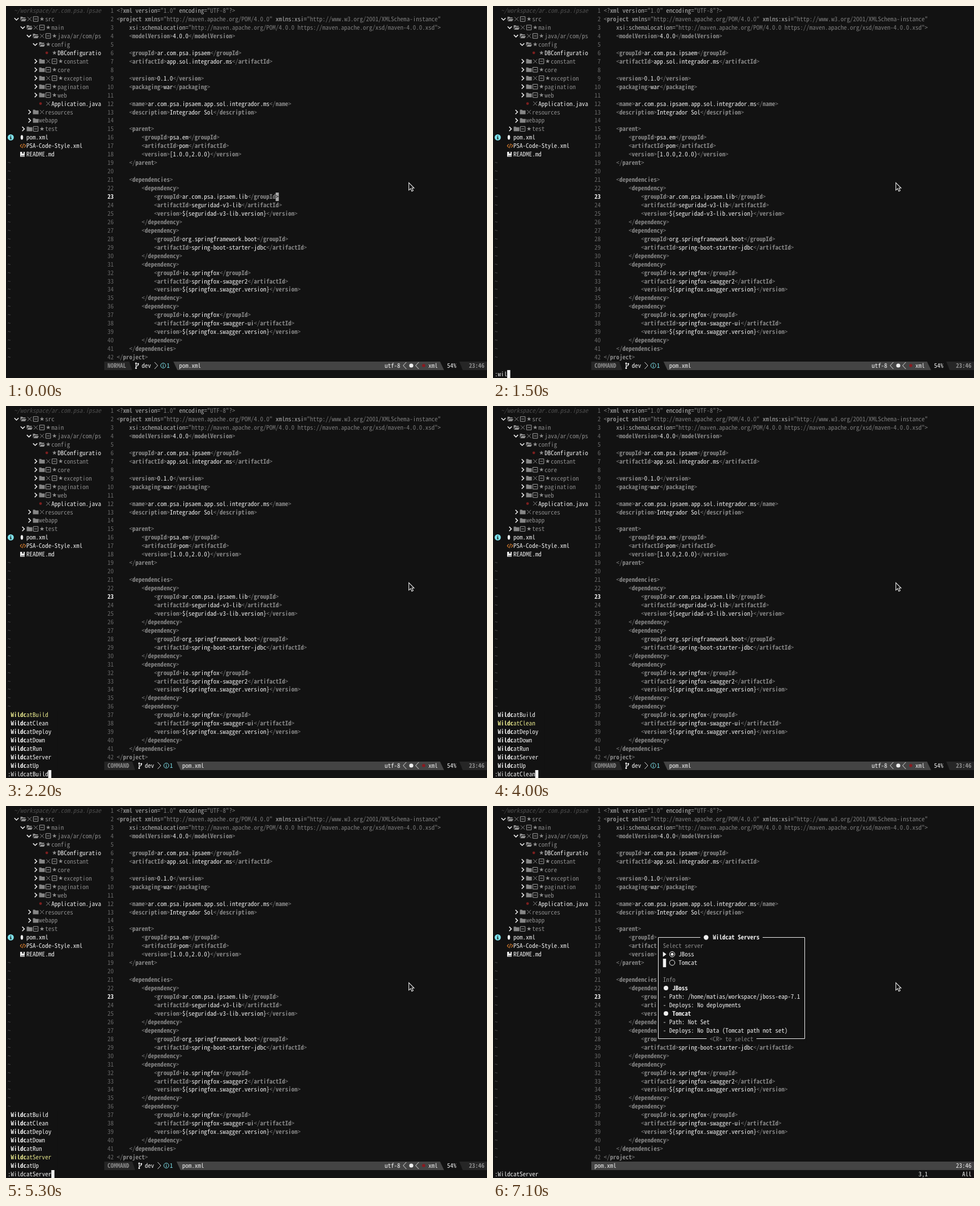
An HTML page for the animation above (8000 ms loop, 851x658 px).

```html
<!DOCTYPE html>
<html lang="en">
<head>
<meta charset="utf-8">
<title>Editor session</title>
<style>
  html, body { margin: 0; width: 100%; height: 100%; overflow: hidden; background: #121212; }
  svg { display: block; width: 100vw; height: 100vh; }
  text {
    font-family: "Noto Sans Mono CJK JP", "Noto Sans Mono CJK SC", "Noto Sans Mono CJK KR", "Noto Sans Mono", "DejaVu Sans Mono", monospace;
    white-space: pre;
    text-rendering: geometricPrecision;
    fill: #eee;
  }
  .bold, .tag, .now, .hit { font-weight: 700; }
  .tag { fill: #848484; }
  .mark { fill: #808080; }
  .attr { fill: #b0b0b0; }
  .str { fill: #7c7c7c; }
  .num { fill: #686868; }
  .dir { fill: #8a8a8a; }
  .dim { fill: #505050; }
  .root { fill: #4c4c4c; font-style: italic; }
  .mode { fill: #8a8a8a; font-weight: 700; }
  .info { fill: #7fe3ec; }
  .dark { fill: #121212; }
  .sel text { fill: #e3e38a; }
  #pointer { animation: drift 8s step-end infinite; }
  @keyframes drift {
    0%, 11.25% { transform: none; }
    7.5% { transform: translate(-4px, -8px); }
  }
</style>
</head>
<body>
<svg id="stage" viewBox="0 0 851 658"></svg>
<script>
const CELL = 5.513, ROW = 14.95;
const X = col => 3 + col * CELL;
const Y = row => 1.1 + row * ROW;
const stage = document.getElementById('stage');
const sheet = document.head.appendChild(document.createElement('style'));

function el(tag, attrs, parent = stage) {
  const node = document.createElementNS('http://www.w3.org/2000/svg', tag);
  for (const key in attrs) node.setAttribute(key, attrs[key]);
  return parent.appendChild(node);
}

// Pick the font size whose advance equals one grid cell.
const probe = el('text', { y: -50, style: 'font-size:100px' });
probe.textContent = 'M'.repeat(20);
const size = CELL * 2000 / probe.getComputedTextLength();
probe.style.fontSize = size + 'px';
const gap = CELL - probe.getComputedTextLength() / 20;
probe.remove();
stage.style.fontSize = size + 'px';
stage.style.letterSpacing = gap + 'px';

function put(col, row, text, cls = '', parent = stage) {
  el('text', { x: X(col), y: Y(row) + 11, class: cls }, parent).textContent = text;
}
function box(x, y, width, height, fill, parent = stage) {
  el('rect', { x, y, width, height, fill }, parent);
}
function block(col, row, parent, fill = '#f2f2f2') {
  box(X(col), Y(row), CELL, ROW, fill, parent);
}
function shape(x, y, d, fill, parent = stage) {
  el('path', { d, fill, transform: `translate(${x} ${y})` }, parent);
}
function stroke(x, y, d, color, width = 1, parent = stage) {
  el('path', { d, fill: 'none', stroke: color, 'stroke-width': width, transform: `translate(${x} ${y})` }, parent);
}
function disc(cx, cy, r, fill, parent = stage) {
  el('circle', { cx, cy, r, fill }, parent);
}
function ring(cx, cy, r, color, parent = stage) {
  el('circle', { cx, cy, r, fill: 'none', stroke: color }, parent);
}
function poly(points, fill, parent = stage) {
  el('polygon', { points, fill }, parent);
}

// A group that is visible only between two times of the loop.
let count = 0;
function during(from, to) {
  const id = 'w' + count++;
  sheet.textContent += `@keyframes ${id} { 0% { visibility: hidden } ${from / 80}% { visibility: visible } ${to / 80}% { visibility: hidden } }\n`;
  return el('g', { style: `animation: ${id} 8s step-end infinite` });
}

// File tree
const starPath = 'M' + Array.from({ length: 10 }, (_, i) => {
  const r = i % 2 ? 1.6 : 4.1, a = i * Math.PI / 5;
  return `${(r * Math.sin(a)).toFixed(2)} ${(-r * Math.cos(a)).toFixed(2)}`;
}).join('L') + 'Z';

const icons = {
  'v': (x, y) => stroke(x - 1, y, 'M-3.7-1.8L0 1.9L3.7-1.8', '#eee', 1.5),
  '>': (x, y) => stroke(x, y, 'M-1.9-3.8L1.9 0L-1.9 3.8', '#eee', 1.5),
  'o': (x, y) => shape(x, y, 'M-5-4h3.5l1 1.2H4V-1H-2.5L-5 3ZM-2 0H5.5L3.5 4H-4.3Z', '#909090'),
  'f': (x, y) => shape(x, y, 'M-5-4h3.6l1.2 1.2H5V4H-5Z', '#858585'),
  'x': (x, y) => stroke(x, y, 'M-3.6-3.6L3.6 3.6M3.6-3.6L-3.6 3.6', '#858585'),
  '-': (x, y) => stroke(x, y, 'M-4.2-4.2H4.2V4.2H-4.2ZM-2.4 0H2.4', '#a0a0a0'),
  '*': (x, y) => shape(x, y, starPath, '#909090'),
  'j': (x, y) => disc(x - 2.5, y, 2.4, '#7c1f1f'),
  'm': (x, y) => el('ellipse', { cx: x - 2.5, cy: y, rx: 2.2, ry: 4.2, fill: '#eee' }),
  'c': (x, y) => stroke(x - .5, y, 'M-2.2-3L-4.8 0L-2.2 3M2.2-3L4.8 0L2.2 3M1-4L-1 4', '#e0812f', 1.1),
  'b': (x, y) => {
    shape(x - 1.5, y, 'M-4-4.3H4V4.3H-4Z', '#eee');
    shape(x - 1.5, y, 'M-.5-4.3H2V-.8L.7-1.8L-.5-.8ZM-2.5 2.2H4V3.1H-2.5Z', '#121212');
  }
};

const tree = [
  [2, 'vox-*', 'src', 'dir'],
  [4, 'vox-*', 'main', 'dir'],
  [6, 'vox-*', 'java/ar/com/ps', 'dir'],
  [8, 'vo*', 'config', 'dir'],
  [12, 'j*', 'DBConfiguratio'],
  [8, '>fx-*', 'constant', 'dir'],
  [8, '>f-*', 'core', 'dir'],
  [8, '>fx-*', 'exception', 'dir'],
  [8, '>f-*', 'pagination', 'dir'],
  [8, '>f-*', 'web', 'dir'],
  [10, 'jx', 'Application.java'],
  [6, '>fx', 'resources', 'dir'],
  [6, '>f', 'webapp', 'dir'],
  [4, '>f-*', 'test', 'dir'],
  [4, 'm', 'pom.xml'],
  [4, 'c', 'PSA-Code-Style.xml'],
  [4, 'b', 'README.md']
];
put(2, 0, '~/workspace/ar.com.psa.ipsae', 'root');
tree.forEach(([col, marks, label, cls], i) => {
  [...marks].forEach((m, k) => icons[m](X(col + 2 * k) + CELL, Y(i + 1) + 7));
  put(col + 2 * marks.length, i + 1, label, cls);
});
disc(8.4, 232.4, 5.4, '#7fe3ec');
shape(8.4, 232.4, 'M-.8-3.2H.8V-1.8H-.8ZM-1.5-.9H.8V2.2H1.6V3.1H-1.6V2.2H-.7V0H-1.5Z', '#121212');
for (let row = 18; row < 42; row++) put(0, row, '~', 'dim');

// Editor text
const pom = `<?xml version="1.0" encoding="UTF-8"?>
<project xmlns="http://maven.apache.org/POM/4.0.0" xmlns:xsi="http://www.w3.org/2001/XMLSchema-instance"
    xsi:schemaLocation="http://maven.apache.org/POM/4.0.0 https://maven.apache.org/xsd/maven-4.0.0.xsd">
    <modelVersion>4.0.0</modelVersion>

    <groupId>ar.com.psa.ipsaem</groupId>
    <artifactId>app.sol.integrador.ms</artifactId>

    <version>0.1.0</version>
    <packaging>war</packaging>

    <name>ar.com.psa.ipsaem.app.sol.integrador.ms</name>
    <description>Integrador Sol</description>

    <parent>
        <groupId>psa.em</groupId>
        <artifactId>pom</artifactId>
        <version>[1.0.0,2.0.0)</version>
    </parent>

    <dependencies>
        <dependency>
            <groupId>ar.com.psa.ipsaem.lib</groupId>
            <artifactId>seguridad-v3-lib</artifactId>
            <version>\${seguridad-v3-lib.version}</version>
        </dependency>
        <dependency>
            <groupId>org.springframework.boot</groupId>
            <artifactId>spring-boot-starter-jdbc</artifactId>
        </dependency>
        <dependency>
            <groupId>io.springfox</groupId>
            <artifactId>springfox-swagger2</artifactId>
            <version>\${springfox.swagger.version}</version>
        </dependency>
        <dependency>
            <groupId>io.springfox</groupId>
            <artifactId>springfox-swagger-ui</artifactId>
            <version>\${springfox.swagger.version}</version>
        </dependency>
    </dependencies>
</project>`;

const TOKEN = /"[^"]*"|[\w:]+(?==")|<[\/?]?|\??>|=|[^<>"=\s?]+/g;
pom.split('\n').forEach((line, row) => {
  put(32, row, String(row + 1).padStart(2), row === 22 ? 'now' : 'num');
  let last = '';
  for (const { 0: part, index } of line.matchAll(TOKEN)) {
    const next = line[index + part.length];
    const cls = part[0] === '"' ? 'str'
      : /^[<?>]/.test(part) ? 'mark'
      : last[0] === '<' ? 'tag'
      : part === '=' || next === '=' ? 'attr' : '';
    put(35 + index, row, part, cls);
    last = part;
  }
});

const caret = during(0, 800);
block(86, 22, caret, '#a8a8a8');
put(86, 22, '>', 'dark', caret);

// Status line
const barTop = Y(42), barMid = barTop + 7, barEnd = barTop + ROW;
const BAND = '#444', EDGE = '#262626';

function statusLine(mode, from, to) {
  const g = during(from, to), end = 33 + mode.length;
  const left = X(end), start = X(end + 14);
  poly(`${X(31)},${barTop} ${left},${barTop} ${left + 5},${barEnd} ${X(31)},${barEnd}`, EDGE, g);
  put(32, 42, mode, 'mode', g);
  const bx = X(end + 2) + 2.5;
  stroke(bx, barMid, 'M-1.5-3V4M2.3-2V-.5L-1.5 2', '#eee', 1.2, g);
  disc(bx - 1.5, barMid - 4, 1.5, '#eee', g);
  disc(bx + 2.3, barMid - 3, 1.5, '#eee', g);
  disc(bx - 1.5, barMid + 4.5, 1.5, '#eee', g);
  put(end + 4, 42, 'dev', '', g);
  stroke(X(end + 8) + 3.5, barMid, 'M-2.8-6L2.8 0L-2.8 6', '#ddd', 1, g);
  const ix = X(end + 10) + 5;
  ring(ix, barMid, 4.4, '#7fe3ec', g);
  stroke(ix, barMid, 'M0-2.8V-1.5M0-.6V2.8', '#7fe3ec', 1.1, g);
  put(end + 12, 42, '1', 'info', g);
  poly(`${start + 1},${barTop} 768,${barTop} 775,${barEnd} ${start + 8},${barEnd}`, BAND, g);
  put(end + 16, 42, 'pom.xml', '', g);
  put(121, 42, 'utf-8', '', g);
  for (const x of [705.5, 727.5]) stroke(x, barMid, 'M2.8-6L-2.8 0L2.8 6', '#ddd', 1, g);
  disc(717, barMid, 3.6, '#eee', g);
  disc(739, barMid, 2.8, '#8a1a20', g);
  put(135, 42, 'xml', '', g);
  put(141, 42, '54%', '', g);
  poly(`802,${barTop} 851,${barTop} 851,${barEnd} 808,${barEnd}`, EDGE, g);
  put(148, 42, '23:46', 'mode', g);
}
statusLine('NORMAL', 0, 800);
statusLine('COMMAND', 800, 5900);

// Command line and its completion menu
function command(text, from, to) {
  const g = during(from, to);
  put(0, 43, ':' + text, '', g);
  block(text.length + 1, 43, g);
  return g;
}
const typed = [800, 1200, 1300, 1500, 1700, 2000, 2200];
for (let i = 0; i < 6; i++) command('wildc'.slice(0, i), typed[i], typed[i + 1]);

const verbs = ['Build', 'Clean', 'Deploy', 'Down', 'Run', 'Server', 'Up'];
const picks = [2200, 4000, 4200, 4600, 5000, 5300, 5900];
for (let i = 0; i < 6; i++) {
  const g = command('Wildcat' + verbs[i], picks[i], picks[i + 1]);
  box(0, Y(36), X(16), 7 * ROW, '#121212', g);
  verbs.forEach((verb, k) => {
    const item = el('g', { class: k === i ? 'sel' : '' }, g);
    put(1, 36 + k, 'Wildc', 'hit', item);
    put(6, 36 + k, 'at' + verb, '', item);
  });
}

// Server dialog
const dialog = during(5900, 8000);
const say = (col, row, text, cls) => put(col, row, text, cls, dialog);
box(X(52), Y(15), 48 * CELL, 13 * ROW, '#121212', dialog);
stroke(0, 0, `M${X(66)} 232.5H292.5V411.5H${X(68)}M${X(84)} 411.5H551.5V232.5H${X(86)}`, '#eee', 1, dialog);
disc(377, 232.5, 4.2, '#eee', dialog);
say(70, 15, 'Wildcat Servers', 'bold');
say(69, 27, '<CR> to select', 'mark');
say(54, 16, 'Select server', 'dir');
ring(317, 262.2, 4.7, '#eee', dialog);
disc(317, 262.2, 2.5, '#eee', dialog);
ring(317, 277.2, 4.7, '#eee', dialog);
say(59, 17, 'JBoss');
say(59, 18, 'Tomcat');
say(54, 20, 'Info', 'dir');
disc(306, Y(21) + 7, 4, '#eee', dialog);
say(57, 21, 'JBoss', 'bold');
say(54, 22, '- Path: /home/matias/workspace/jboss-eap-7.1');
say(54, 23, '- Deploys: No deployments');
disc(306, Y(24) + 7, 4, '#eee', dialog);
say(57, 24, 'Tomcat', 'bold');
say(54, 25, '- Path: Not Set');
say(54, 26, '- Deploys: No Data (Tomcat path not set)');
box(X(31), barTop, 851 - X(31), ROW, BAND, dialog);
say(32, 42, 'pom.xml');
say(148, 42, '23:46');
say(0, 43, ':WildcatServer');
say(150, 43, 'All');

[[5900, 7100], [7100, 8000]].forEach(([from, to], i) => {
  const g = during(from, to);
  block(54, 17 + i, g);
  shape(X(54), 262.2, 'M0-4.5L6 0L0 4.5Z', i ? '#f2f2f2' : '#121212', g);
  put(136, 43, `${i + 2},1`, '', g);
});

// Mouse pointer
const pointer = el('g', { id: 'pointer' });
el('path', {
  d: 'M712.7 312.5V325.8L715.8 322.9L718 327.7L720.4 326.6L718.2 322H722Z',
  fill: '#121212', stroke: '#e8e8e8', 'stroke-width': 1.1
}, pointer);
</script>
</body>
</html>
```
